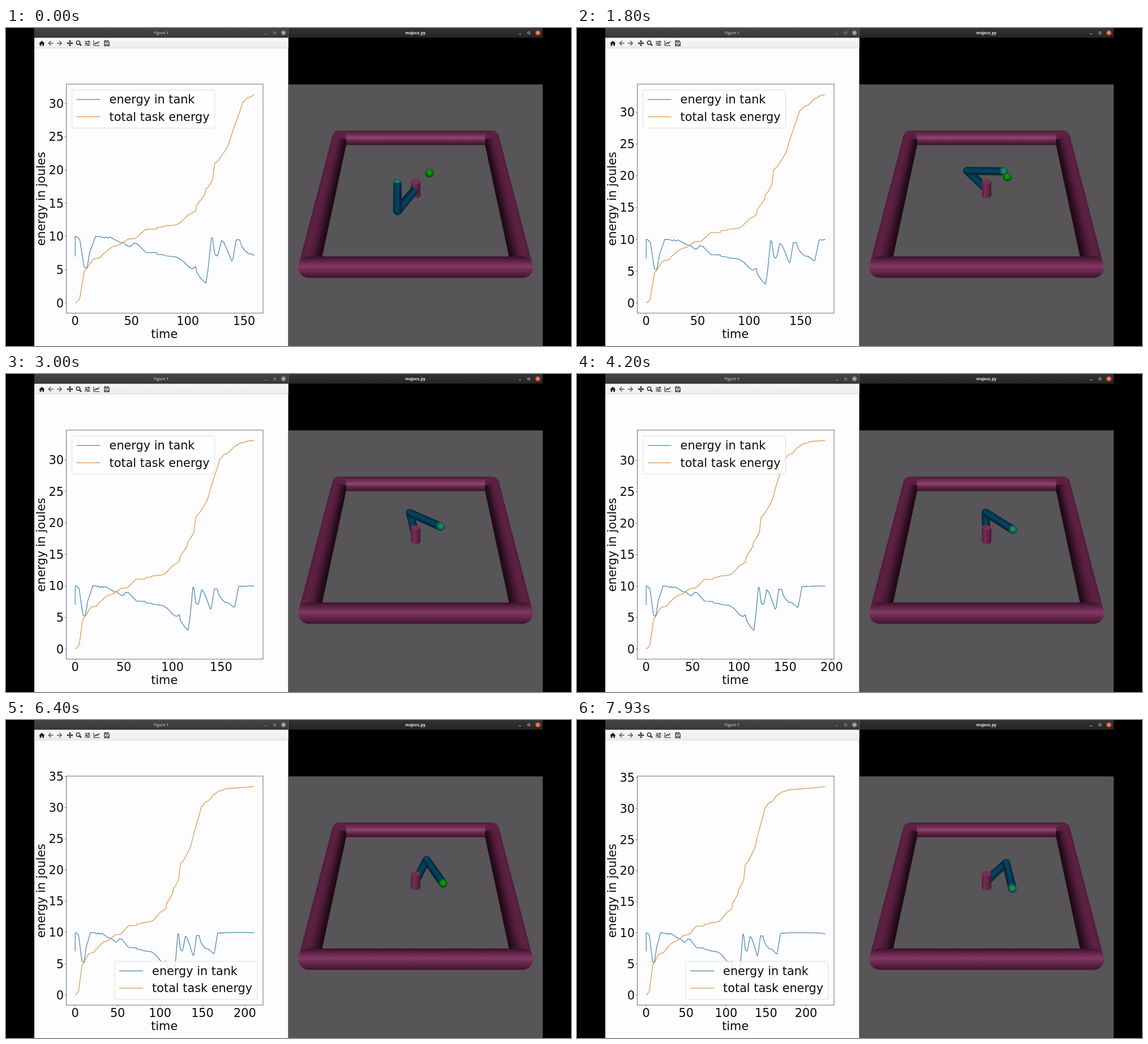
Animation, 998 px wide and 561 px high, one loop 8000 ms. Source, as an HTML page:

```html
<!DOCTYPE html>
<html lang="en">
<head>
<meta charset="utf-8">
<title>Energy tank</title>
<style>
  html, body { margin: 0; width: 100%; height: 100%; overflow: hidden; background: #000; }
  svg { display: block; width: 100%; height: 100%; }
  .plot text { font: 20.8px "DejaVu Sans", sans-serif; fill: #0c0c0c; }
  .bar text { font: bold 6.7px "Open Sans", sans-serif; text-anchor: middle; }
  .thin { fill: none; stroke: #4a4a4a; stroke-width: .8; }
  .curve { fill: none; stroke-width: 1.25; stroke-linejoin: round; }
  .blue { stroke: #4489ad; }
  .orange { stroke: #dd9544; }
  .icons { fill: none; stroke: #1c1c1c; stroke-width: 1.4; }
  .icons .solid { fill: #1c1c1c; stroke: none; }
</style>
</head>
<body>
<svg viewBox="0 0 998 561" preserveAspectRatio="none">
  <defs>
    <linearGradient id="title" x2="0" y2="1">
      <stop stop-color="#464444"/><stop offset="1" stop-color="#383636"/>
    </linearGradient>
    <linearGradient id="titleActive" x2="0" y2="1">
      <stop stop-color="#343232"/><stop offset="1" stop-color="#262424"/>
    </linearGradient>
    <linearGradient id="tools" x2="0" y2="1">
      <stop stop-color="#f8f7f8"/><stop offset="1" stop-color="#eeedee"/>
    </linearGradient>
    <linearGradient id="topTube" x2="0" y2="1">
      <stop stop-color="#4c1a35"/><stop offset=".3" stop-color="#732e54"/>
      <stop offset=".5" stop-color="#8d4770"/><stop offset=".68" stop-color="#6b2a4e"/>
      <stop offset="1" stop-color="#35122a"/>
    </linearGradient>
    <linearGradient id="lowTube" x2="0" y2="1">
      <stop stop-color="#36122a"/><stop offset=".2" stop-color="#5f2245"/>
      <stop offset=".46" stop-color="#823a65"/><stop offset=".6" stop-color="#702d55"/>
      <stop offset=".8" stop-color="#592041"/><stop offset="1" stop-color="#3d142d"/>
    </linearGradient>
    <linearGradient id="post">
      <stop stop-color="#562040"/><stop offset=".35" stop-color="#742f54"/>
      <stop offset="1" stop-color="#481932"/>
    </linearGradient>
    <radialGradient id="green" cy=".42">
      <stop stop-color="#12a812"/><stop offset=".5" stop-color="#0c8a0c"/><stop offset="1" stop-color="#064806"/>
    </radialGradient>
    <radialGradient id="teal" cy=".42">
      <stop stop-color="#1f9478"/><stop offset=".6" stop-color="#167562"/><stop offset="1" stop-color="#0a443f"/>
    </radialGradient>
    <radialGradient id="joint" cy=".4">
      <stop stop-color="#0a4564"/><stop offset=".55" stop-color="#063a55"/><stop offset="1" stop-color="#02273a"/>
    </radialGradient>
    <clipPath id="axes"><rect x="106.5" y="99" width="347.5" height="404"/></clipPath>
  </defs>

  <!-- figure window -->
  <g class="bar">
    <rect x="50" width="448.5" height="561" fill="#fdfcfe"/>
    <rect x="50" width="448.5" height="17.5" fill="url(#title)"/>
    <text x="274" y="11.2" fill="#a3a1a0">Figure 1</text>
    <g fill="none" stroke="#a3a1a0" stroke-width=".8">
      <path d="M457 10.5h4M472.800 6.800h3.600v3.600h-3.600z"/>
      <circle cx="490.200" cy="8.500" r="4.200" fill="#8a8888" stroke="none"/>
      <path d="M488.600 6.900l3.200 3.200m0-3.200l-3.200 3.200" stroke="#f2f2f2"/>
    </g>
    <rect x="50" y="17.500" width="448.500" height="17.500" fill="url(#tools)"/>
    <path d="M50 35.300h448.500" stroke="#d2d0d2" stroke-width=".8"/>
  </g>
  <g class="icons">
    <path class="solid" d="M58 27.300l5.300-4.800 5.300 4.800h-1.600v4.200h-2.600v-3h-2.200v3h-2.600v-4.200z"/>
    <path d="M83.500 26.800h-8m3.800-4l-4 4 4 4" stroke="#555"/>
    <path d="M90 26.800h8m-3.800-4l4 4-4 4" stroke="#555"/>
    <path d="M108.500 26.800h9M113 22.300v9"/>
    <path class="solid" d="M107.500 26.800l2.600-2.200v4.400zM118.500 26.800l-2.600-2.200v4.400zM113 21.300l-2.200 2.600h4.400zM113 32.300l-2.200-2.600h4.400z"/>
    <circle cx="127.500" cy="25.800" r="3.200"/><path d="M130 28.300l3 3" stroke-width="2"/>
    <path d="M139 23.800h10M139 26.900h10M139 30h10" stroke-width="1"/>
    <path d="M146 22.400v2.800M142 25.500v2.800M145 28.600v2.800" stroke-width="1.600"/>
    <path d="M155 22v9h10.500" stroke-width="1"/><path d="M156.500 28.800l3-3 2 1.600 3.500-4"/>
    <path d="M174 22.700h6.200l2 2v6.600h-8.200z" stroke-width="1.200"/>
    <path d="M176 23v2.600h3.600v-2.600M176 31v-2.600h4.300v2.600" stroke-width="1"/>
  </g>

  <!-- chart -->
  <g class="plot">
    <g clip-path="url(#axes)">
      <path id="tank" class="curve blue"/>
      <path id="total" class="curve orange"/>
    </g>
    <rect class="thin" x="106.500" y="99" width="347.500" height="404"/>
    <g id="ticks"></g>
    <text x="279.700" y="546.500" text-anchor="middle">time</text>
    <text transform="translate(68.500 301.300) rotate(-90)" text-anchor="middle">energy in joules</text>
    <g id="legend">
      <rect x="116.500" y="109.300" width="252" height="67.200" rx="4" fill="#fff" fill-opacity=".8" stroke="#d6d5d7" stroke-width=".8"/>
      <path class="curve blue" d="M124.600 126h42"/>
      <path class="curve orange" d="M124.600 156.500h42"/>
      <text x="182.600" y="133.200">energy in tank</text>
      <text x="182.600" y="163.700">total task energy</text>
    </g>
  </g>

  <!-- simulator window -->
  <g class="bar">
    <rect x="499" width="449" height="17" fill="url(#titleActive)"/>
    <text x="723" y="11.200" fill="#f4f2f2">mujoco_py</text>
    <path d="M906 10.500h4M921.800 6.800h3.600v3.600h-3.600z" fill="none" stroke="#d8d6d6" stroke-width=".8"/>
    <circle cx="939.500" cy="8.500" r="4.300" fill="#df6038"/>
    <path d="M937.900 6.900l3.200 3.200m0-3.200l-3.200 3.200" stroke="#f8eee8" stroke-width=".8"/>
    <rect x="499" y="99.500" width="449" height="461.500" fill="#575557"/>
  </g>
  <rect x="576" y="181" width="295" height="25.500" rx="12.500" fill="url(#topTube)"/>
  <g id="sides"></g>
  <rect x="516.300" y="403" width="414.500" height="37.700" rx="18" fill="url(#lowTube)"/>
  <g id="robot">
    <g id="pillar">
      <path d="M715 271v24.500a8.500 4.500 0 0 0 17 0v-24.500z" fill="url(#post)"/>
      <ellipse cx="723.500" cy="271" rx="8.500" ry="4.600" fill="#753056"/>
    </g>
    <circle id="target" r="7.600" fill="url(#green)"/>
    <circle id="tip" r="7.300" fill="url(#teal)"/>
    <circle id="elbow" fill="url(#joint)"/>
  </g>
</svg>
<script>
const NS = 'http://www.w3.org/2000/svg';
const $ = id => document.getElementById(id);
const LOOP = 8000, STEP = 1000 / 15;

function make(tag, attrs, parent) {
  const el = document.createElementNS(NS, tag);
  set(el, attrs);
  parent.append(el);
  return el;
}
function set(el, attrs) {
  for (const k in attrs) el.setAttribute(k, attrs[k]);
}
const lerp = (a, b, u) => a + (b - a) * u;

// Chart data: sample number, joules
const tank = [
  0,7, 0,10, 1,10, 3,9.7, 4,9.6, 8,5.35, 10,5.2, 11,5.7, 13,7.7, 16,9, 18,10, 23,9.95, 26,9.75,
  27,9.95, 29,9.75, 31,9.9, 36,9.45, 40,9.1, 43,9.05, 45,8.75, 48,8.45, 50,8.6, 52,9, 55,8.9, 58,8.4,
  63,7.6, 72,7.55, 73,7.3, 78,7.25, 80,7.1, 90,6.9, 95,6.4, 101,5.4, 104,5.15, 107,5.45,
  108,4.6, 112,3.6, 116,2.95, 118,5, 121,9.8, 122,9.7, 124,7.3, 126,7.05, 127,7.3, 130,9.4,
  132,9.1, 135,8, 139,6.3, 140,6.5, 143,9.5, 146,9.5, 148,8.5, 150,8, 154,7.4, 157,7.35, 160,7,
  163,6.6, 164,6.7, 168,9.9, 170,9.97, 171,9.86, 173,10, 174,9.9, 178,10, 200,10, 216,9.97, 226,9.8
];
const total = [
  0,0, 1,.05, 2,.25, 4,.6, 8,4.7, 10,5.1, 15,6.4, 17,6.65, 22,6.8, 25,7.4, 27,7.6, 30,8.1, 34,8.5,
  40,8.8, 43,9.2, 45,9.35, 47,9.6, 53,9.7, 55,9.9, 60,10.7, 63,11.08, 72,11.1, 73,11.38, 77,11.4,
  80,11.6, 88,11.7, 92,11.9, 96,12.5, 100,13.2, 103,13.45, 107,13.85, 108,14.7, 112,15.6,
  115,16.3, 116,17.1, 118,17.4, 122,18.5, 124,21, 127,21.4, 132,22.6, 136,23.7, 140,25.9, 146,28.7,
  149,30.2, 151,30.45, 153,30.85, 157,31.1, 159,31.35, 161,31.7, 164,32.2, 165,32.2, 167,32.4,
  170,32.7, 172,32.7, 174,32.8, 177,32.98, 179,33.03, 184,33.07, 193,33.16, 202,33.25, 211,33.37, 226,33.57
];

// Points up to sample n, the last one interpolated
function upTo(data, n) {
  const pts = [];
  for (let i = 0; i < data.length; i += 2) {
    const x = data[i], y = data[i + 1];
    if (x >= n) {
      const [px, py] = pts[pts.length - 1];
      pts.push([n, lerp(py, y, (n - px) / (x - px))]);
      break;
    }
    pts.push([x, y]);
  }
  return pts;
}

function drawChart(t) {
  const n = Math.round(159 + t * .00817);
  const a = upTo(tank, n), b = upTo(total, n);
  const max = b[b.length - 1][1];
  const px = v => 122.2 + v / n * 316.2;
  const py = v => 485 - v / max * 367.6;
  const line = pts => 'M' + pts.map(([x, y]) => px(x).toFixed(2) + ' ' + py(y).toFixed(2)).join('L');
  set($('tank'), { d: line(a) });
  set($('total'), { d: line(b) });

  const box = $('ticks');
  box.replaceChildren();
  const tick = (d, x, y, anchor, v) => {
    make('path', { d, class: 'thin' }, box);
    make('text', { x, y, 'text-anchor': anchor }, box).textContent = v;
  };
  for (let v = 0; v <= n * 1.05; v += 50) tick(`M${px(v)} 503v2.600`, px(v), 523.8, 'middle', v);
  for (let v = 0; v <= max * 1.05; v += 5) tick(`M106.500 ${py(v)}h-2.600`, 102, py(v) + 7.6, 'end', v);
  set($('legend'), { transform: n < 205 ? '' : 'translate(75.500 316.500)' });
}

// Side tubes: tapered strips darkening towards the inside
function drawSides() {
  const shades = [[84, 30, 60], [94, 34, 67], [88, 31, 62], [72, 25, 51], [48, 16, 34], [26, 9, 19]];
  const shade = u => {
    const f = u * (shades.length - 1), i = Math.min(shades.length - 2, Math.floor(f));
    return `rgb(${shades[i].map((c, k) => Math.round(lerp(c, shades[i + 1][k], f - i)))})`;
  };
  const left = make('g', { id: 'side' }, $('sides'));
  make('circle', { cx: 588.5, cy: 193.500, r: 12.4, fill: '#5c2142' }, left);
  const count = 20;
  for (let i = 0; i < count; i++) {
    const u = i / count;
    const d = `M${lerp(576.500, 600.500, u)} ${lerp(190, 197, u)}L600.500 197V206L558 404L552 424`
      + `L${lerp(516.500, 552, u)} ${lerp(419, 424, u)}Z`;
    make('path', { d, fill: shade(u) }, left);
  }
  make('use', { href: '#side', transform: 'translate(1447 0) scale(-1 1)' }, $('sides'));
}

// Time, shoulder angle, forearm angle, target x, target y
const poses = [
  [0, 240, 92, 748, 256],
  [600, 182, 47, 752.5, 258.5],
  [1200, 149, 18, 756.5, 260.8],
  [1800, 127, -1.3, 760, 263],
  [3000, 100.5, -34, 766.7, 268.3],
  [4200, 92, -43.7, 769.8, 274.2],
  [5270, 81.3, -54.8, 772, 281.2],
  [6400, 70, -66.4, 772, 288.2],
  [7930, 53, -82.9, 768.3, 296]
];

function poseAt(t) {
  const last = poses.length - 1;
  let i = 0;
  while (i < last - 1 && t > poses[i + 1][0]) i++;
  const a = poses[i], b = poses[i + 1], h = b[0] - a[0], u = (t - a[0]) / h;
  const slope = (j, k) => {
    const p = poses[Math.max(0, j - 1)], q = poses[Math.min(last, j + 1)];
    return (q[k] - p[k]) / (q[0] - p[0]) * h;
  };
  return [1, 2, 3, 4].map(k =>
    a[k] * (1 + 2 * u) * (1 - u) ** 2 + slope(i, k) * u * (1 - u) ** 2 +
    b[k] * u * u * (3 - 2 * u) + slope(i + 1, k) * u * u * (u - 1));
}

// Ground plane to stage, with the perspective scale
function project([x, y]) {
  const depth = 1 / (.001546 + y * .0002656), s = .2445 * depth;
  return { x: 723.5 + x * s, y: depth - 358, r: .047 * s };
}
const reach = ([x, y], len, deg) => {
  const a = deg * Math.PI / 180;
  return [x + len * Math.cos(a), y + len * Math.sin(a)];
};

const robot = $('robot'), defs = document.querySelector('defs');
function makeLink(id) {
  const grad = make('linearGradient', { id, gradientUnits: 'userSpaceOnUse' }, defs);
  [[0, '#02273a'], [.3, '#063d59'], [.5, '#094461'], [.72, '#05344c'], [1, '#021f2f']]
    .forEach(([offset, color]) => make('stop', { offset, 'stop-color': color }, grad));
  const path = make('path', { fill: `url(#${id})` }, robot);
  return { grad, path };
}
const upper = makeLink('upper'), fore = makeLink('fore');

function placeLink({ grad, path }, p, q) {
  const len = Math.hypot(q.x - p.x, q.y - p.y) || 1;
  const nx = (p.y - q.y) / len, ny = (q.x - p.x) / len;
  const at = (c, k) => `${c.x + nx * c.r * k} ${c.y + ny * c.r * k}`;
  set(path, { d: `M${at(p, -1)}L${at(q, -1)}L${at(q, 1)}L${at(p, 1)}Z` });
  set(grad, {
    x1: p.x - nx * p.r, y1: p.y - ny * p.r,
    x2: p.x + nx * p.r, y2: p.y + ny * p.r
  });
}

function drawRobot(t) {
  const [shoulder, forearm, tx, ty] = poseAt(t);
  const base = [0, .045];
  const bend = reach(base, .385, shoulder);
  const root = project(base), elbow = project(bend), tip = project(reach(bend, .435, forearm));
  placeLink(upper, root, elbow);
  placeLink(fore, elbow, tip);
  set($('elbow'), { cx: elbow.x, cy: elbow.y, r: elbow.r });
  set($('tip'), { cx: tip.x, cy: tip.y });
  set($('target'), { cx: tx, cy: ty });

  // Paint from far to near
  const balls = ty > tip.y ? [$('tip'), $('target')] : [$('target'), $('tip')];
  const arm = [$('elbow'), fore.path];
  robot.append(
    ...(elbow.y > root.y ? [$('pillar'), upper.path] : [upper.path, $('pillar')]),
    ...(tip.y < elbow.y - 5 ? [...balls, ...arm] : [...arm, ...balls]));
}

function draw(now) {
  const t = Math.floor((now % LOOP + 4) / STEP) * STEP % LOOP;
  drawChart(t);
  drawRobot(t);
}

drawSides();
draw(0);
let start;
requestAnimationFrame(function loop(now) {
  start ??= now;
  draw(now - start);
  requestAnimationFrame(loop);
});
</script>
</body>
</html>
```
